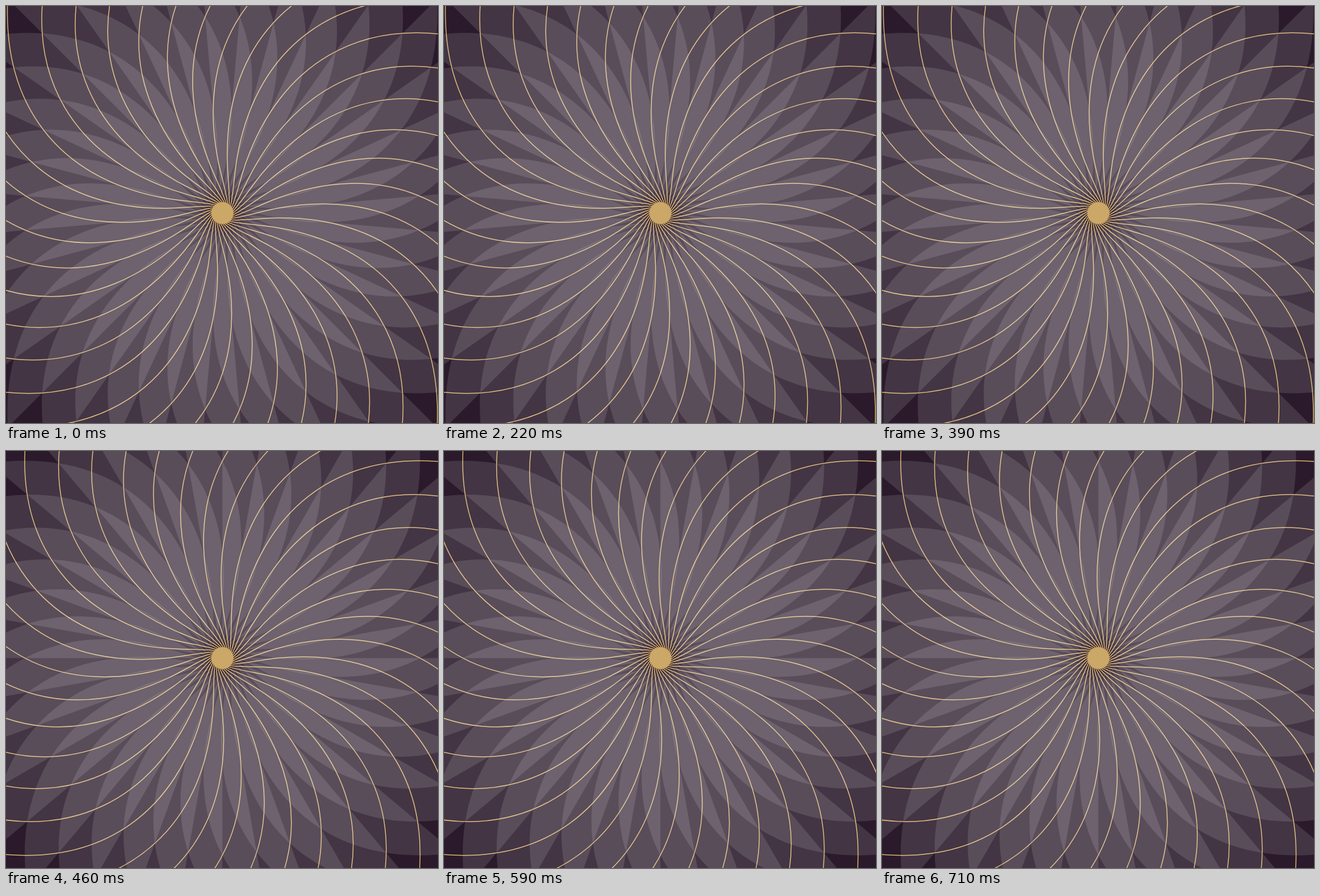
An HTML page with a canvas for the animation above (770 ms loop, 761 px wide and 736 px high).

```html
<!DOCTYPE html>
<html>
<head>
<meta charset="utf-8">
<style>
  html, body { margin: 0; width: 100%; height: 100%; overflow: hidden; background: #2a1a2b; }
  canvas { display: block; }
</style>
</head>
<body>
<canvas id="stage" width="761" height="736"></canvas>
<script>
const ctx = document.getElementById('stage').getContext('2d');
const ARMS = 36, STEP = 2 * Math.PI / ARMS, LOOP = 770;
// Moments at which the wheel jumps by half an arm spacing
const JUMPS = [50, 220, 330, 390, 460, 520, 590, 640, 710];

// One arm, from under the hub outwards
const CURVE = '10 -12C7 -38 -4 -71 -8.9 -99.6C-41 -273 29.65 -423.75 226 -484.7';
const arm = new Path2D('M' + CURVE);
const petal = new Path2D('M0 0L' + CURVE + 'Z');

function eachArm(turn, mirror, draw) {
  for (let i = 0; i < ARMS; i++) {
    ctx.save();
    ctx.rotate(turn + i * STEP);
    ctx.scale(mirror, 1);
    draw();
    ctx.restore();
  }
}

function render(turn) {
  ctx.fillStyle = '#2a1a2b';
  ctx.fillRect(0, 0, 761, 736);
  ctx.save();
  ctx.translate(381.2, 365.5);

  ctx.strokeStyle = '#dcb56e';
  ctx.lineWidth = 1.5;
  eachArm(turn, 1, () => ctx.stroke(arm));

  ctx.fillStyle = 'rgba(255, 255, 255, 0.117)';
  eachArm(turn, -1, () => ctx.fill(petal));

  ctx.fillStyle = '#cba768';
  ctx.beginPath();
  ctx.arc(0, 0, 19.3, 0, 2 * Math.PI);
  ctx.fill();
  ctx.restore();
}

let shown = -1;
function tick() {
  const t = performance.now() % LOOP;
  const pose = JUMPS.filter(jump => jump <= t).length % 2;
  if (pose !== shown) render(pose * STEP / 2);
  shown = pose;
  requestAnimationFrame(tick);
}
tick();
</script>
</body>
</html>
```
